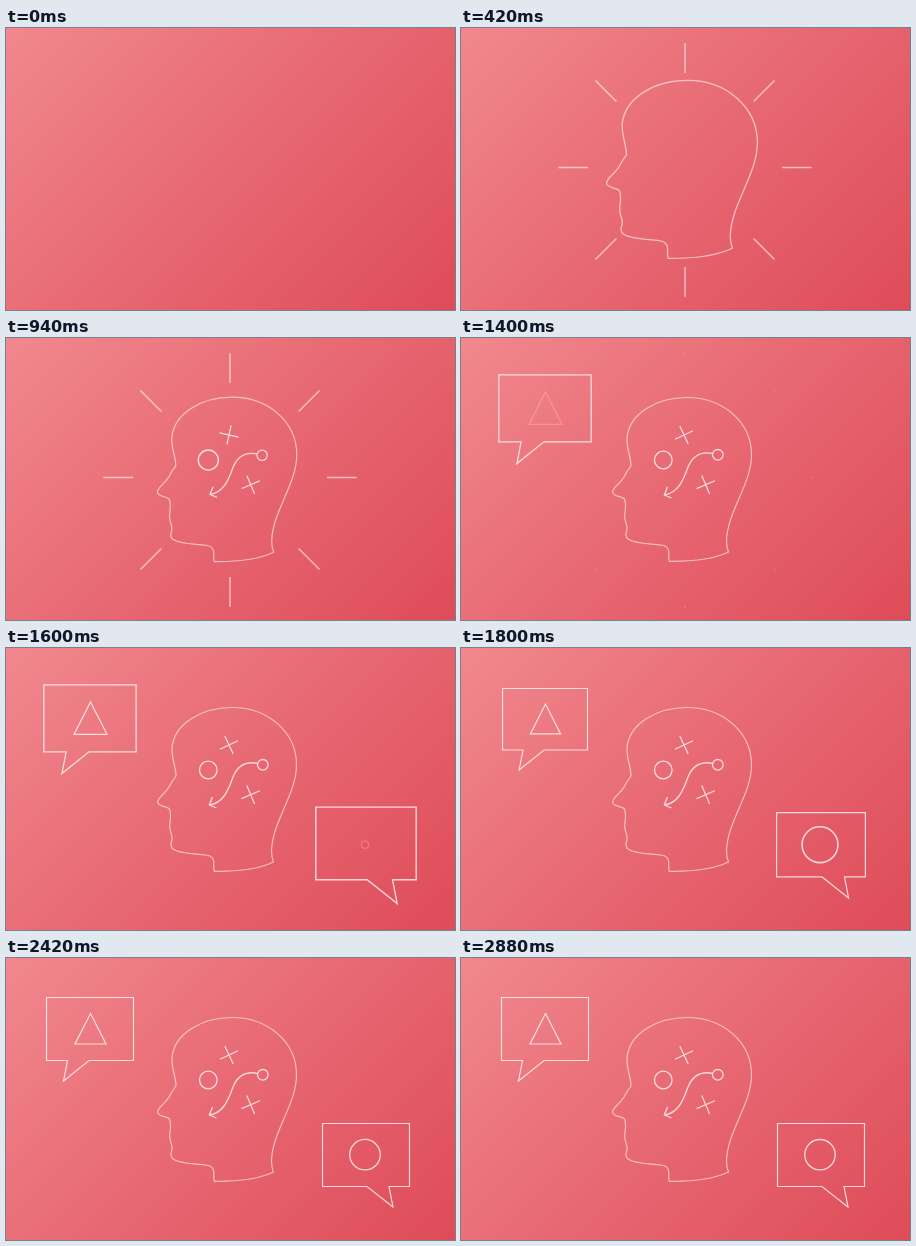
An HTML page with a canvas for the animation above (3700 ms loop, 449 px wide and 282 px high).

```html
<!DOCTYPE html>
<html lang="en">
<head>
<meta charset="utf-8">
<title>Thinking head</title>
<style>
  html, body { margin: 0; width: 100%; height: 100%; overflow: hidden; background: #e76a74; }
  canvas { display: block; width: 449px; height: 282px; }
</style>
</head>
<body>
<canvas id="stage"></canvas>
<script>
const W = 449, H = 282, LOOP = 3700;
const canvas = document.getElementById('stage');
const ctx = canvas.getContext('2d');
const dpr = window.devicePixelRatio || 1;
canvas.width = Math.round(W * dpr);
canvas.height = Math.round(H * dpr);

const sky = ctx.createLinearGradient(41.75, -41.75, 407.25, 323.75);
sky.addColorStop(0, '#f1888d');
sky.addColorStop(0.5, '#e76873');
sky.addColorStop(1, '#de4c58');

const HEAD = new Path2D(`M226 59.5 C262 59.5 290.5 84 290.5 117
  C290.5 146 266 174 265.5 203 Q265.5 209 267.5 214
  C253 221 230 223.5 208.5 223.3 Q207.5 222 207.8 214 Q207.5 208 200 207
  C188 205.5 174 206 167 201 Q163.5 198 166 192
  C167 187 163.5 184 163.7 178 C163.5 174 166 168 163.5 161
  C161 158 152 159 151.6 154 C152 149 159 146 163 139
  Q166 133 170 128 C170 119 165.5 111 166 100 C168 76 195 59.5 226 59.5Z`);
const ARROW = new Path2D(`M251.5 115.3 C239 113 231 119 227 129
  C222 143 217 155 203.5 157 M206.5 149 L203.3 157 L210.5 160`);
const BUBBLE_L = new Path2D('M40.5 39.5H127.5V102.5H83L57.5 123L61.5 102.5H40.5Z');
const BUBBLE_R = new Path2D('M316.5 165.5H403.5V228.5H383L387 249L361 228.5H316.5Z');
const TRIANGLE = new Path2D('M84.5 55.5L100 86H69Z');

const clamp = x => Math.min(1, Math.max(0, x));
const progress = (t, a, b) => clamp((t - a) / (b - a));
const sineInOut = x => (1 - Math.cos(Math.PI * x)) / 2;

// Damped spring from 0 to 1
function spring(t, start, speed = 0.013) {
  const a = (t - start) * speed;
  return a <= 0 ? 0 : 1 - Math.exp(-0.6 * a) * Math.cos(a);
}

function ring(x, y, r) {
  const p = new Path2D();
  p.arc(x, y, r, 0, Math.PI * 2);
  return p;
}

function stroke(path, alpha, width) {
  ctx.strokeStyle = `rgba(255,245,245,${alpha})`;
  ctx.lineWidth = width;
  ctx.stroke(path);
}

function scaled(x, y, s, draw) {
  if (s <= 0.001) return;
  ctx.save();
  ctx.translate(x, y);
  ctx.scale(s, s);
  ctx.translate(-x, -y);
  draw();
  ctx.restore();
}

function cross(x, y, s, angle) {
  if (s <= 0) return;
  const p = new Path2D();
  for (let i = 0; i < 2; i++) {
    const a = (angle + i * 90) * Math.PI / 180;
    const dx = 10 * s * Math.cos(a), dy = 10 * s * Math.sin(a);
    p.moveTo(x - dx, y - dy);
    p.lineTo(x + dx, y + dy);
  }
  stroke(p, 0.82, 1.2);
}

function rays(t) {
  if (t < 300 || t > 1460) return;
  const leave = progress(t, 960, 1390);
  const inner = 97 + 29.3 * sineInOut(leave);
  const outer = 97 + 29.6 * spring(t, 300) + 6 * Math.sin(Math.PI * leave) + leave * 0.8;
  const p = new Path2D();
  for (let i = 0; i < 8; i++) {
    const a = i * Math.PI / 4;
    const cy = i % 4 ? 142 : 139.5;
    p.moveTo(224 + inner * Math.cos(a), cy + inner * Math.sin(a));
    p.lineTo(224 + outer * Math.cos(a), cy + outer * Math.sin(a));
  }
  const fade = 1 - 0.6 * progress(t, 1340, 1400) - 0.4 * progress(t, 1400, 1460);
  stroke(p, 0.62 * fade, 1.5);
}

function strategy(t) {
  scaled(230, 137, spring(t, 520), () => {
    stroke(ARROW, 0.8, 1.3);
    stroke(ring(256.8, 116.8, 5.3), 0.8, 1.3);
  });
  const pop = spring(t, 490);
  const turn1 = -90 * (1 - sineInOut(progress(t, 620, 1340)));
  const turn2 = -90 * (1 - sineInOut(progress(t, 440, 780)));
  cross(223, 97, pop, -25 + turn1);
  cross(244.7, 146.7, pop, -23 + turn2);
  scaled(202.3, 122, spring(t, 690), () => stroke(ring(202.3, 122, 8.8), 0.82, 1.3));
}

function bubbles(t) {
  scaled(84, 81, spring(t, 1245, 0.0112), () => {
    stroke(BUBBLE_L, 0.82, 1.2);
    stroke(TRIANGLE, 0.82 * progress(t, 1350, 1530), 1.2);
  });
  scaled(360, 207, spring(t, 1407, 0.0112), () => stroke(BUBBLE_R, 0.82, 1.2));
  scaled(359, 196.7, spring(t, 1568, 0.0112), () => stroke(ring(359, 196.7, 15.2), 0.82, 1.3));
}

function frame(now) {
  const t = now % LOOP;
  ctx.setTransform(dpr, 0, 0, dpr, 0, 0);
  ctx.fillStyle = sky;
  ctx.fillRect(0, 0, W, H);
  ctx.lineJoin = 'miter';
  rays(t);
  scaled(222, 142, spring(t, 280), () => stroke(HEAD, 0.62, 1.2));
  strategy(t);
  bubbles(t);
}

const start = performance.now();
function tick() {
  frame(performance.now() - start);
  requestAnimationFrame(tick);
}
tick();
</script>
</body>
</html>
```
